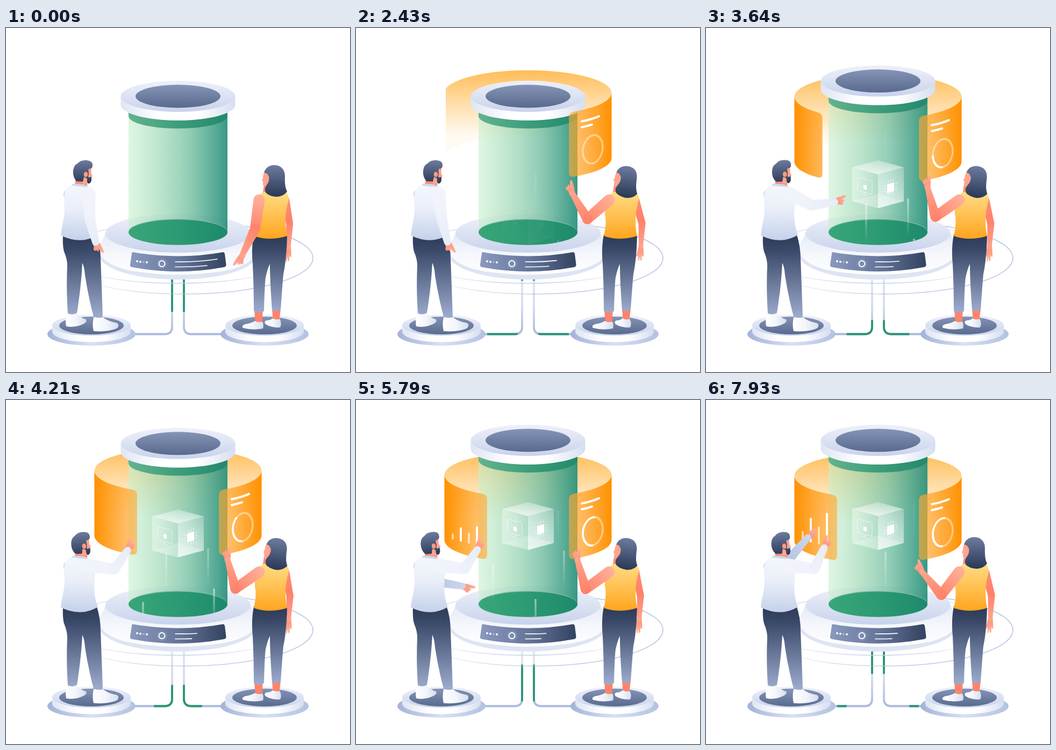
Recreate the animation shown at these times as an HTML page. Size 640 by 640 pixels, loop 8000 ms.

```html
<!DOCTYPE html>
<html lang="en">
<head>
<meta charset="utf-8">
<title>Lab capsule</title>
<style>
html, body { margin: 0; width: 100%; height: 100%; overflow: hidden; background: #fff; }
svg { display: block; width: 100vw; height: 100vh; }
</style>
</head>
<body>
<svg viewBox="0 0 640 640">
  <defs>
    <g id="disc">
      <ellipse cy="569.5" rx="82" ry="21.5" fill="url(#foot)"/>
      <path d="M-73,553V565A73,19.5 0 0 0 73,565V553Z" fill="url(#rim)"/>
      <ellipse cy="553" rx="73" ry="19.5" fill="url(#plate)"/>
      <ellipse cy="553.5" rx="60" ry="16.5" fill="url(#slate)"/>
    </g>
    <g id="pipe" fill="none" stroke-width="3.8">
      <path d="M240,569.5H295Q309,569.5 309,556V466" stroke="url(#tube)"/>
      <path id="flow" d="M244,569.5H295Q309,569.5 309,556V468" stroke="#2a9475" stroke-dasharray="68 102"/>
    </g>
    <clipPath id="glassClip"><path class="glass"/></clipPath>
    <clipPath id="rightClip"><path class="right"/></clipPath>
  </defs>

  <use href="#pipe"/>
  <use href="#pipe" transform="matrix(-1 0 0 1 640 0)"/>
  <g fill="none" stroke-width="1.3">
    <ellipse cx="331" cy="428" rx="240" ry="67" stroke="url(#orbit)"/>
    <ellipse cx="320" cy="420" rx="226" ry="55" stroke="url(#orbit2)"/>
  </g>

  <ellipse cx="320" cy="420" rx="148" ry="48" fill="url(#skirt)"/>
  <path d="M185,380Q183,392 172,405Q171,440 235,452Q320,466 405,452Q469,440 468,405Q457,392 455,380Z" fill="url(#body)"/>
  <ellipse cx="320" cy="382" rx="135" ry="36" fill="url(#plate)"/>
  <path d="M236,417Q320,432 404,417Q406,417 407,420L409.500,440Q410,444 405,445Q320,461 235,445Q230,444 231,440L234,420Q234,417 236,417Z" fill="url(#console)"/>
  <g fill="#fff">
    <circle cx="244" cy="434" r="2"/><circle cx="250" cy="435" r="2"/>
    <circle cx="256" cy="435.500" r="2" opacity=".3"/><circle cx="262" cy="436" r="2"/>
  </g>
  <circle cx="290" cy="438.500" r="10" fill="#8191b3" opacity=".7"/>
  <circle cx="290" cy="438.500" r="5.500" fill="none" stroke="#fff" stroke-width="2"/>
  <g fill="none" stroke="#fff" stroke-width="1.600" stroke-linecap="round">
    <path class="line" d="M315,435Q355,436 393,430" pathLength="1"/>
    <path class="line" d="M315,444.500Q345,445 374,442" pathLength="1"/>
  </g>

  <g class="band"><path id="wall" fill="url(#wallFill)"/></g>

  <path class="glass" fill="url(#glassFill)"/>
  <ellipse cx="320" cy="379.500" rx="92" ry="24.500" fill="#86bda9"/>
  <ellipse cx="320" cy="380" rx="92" ry="23.500" fill="url(#pool)"/>
  <g clip-path="url(#glassClip)">
    <g id="streaks"></g>
    <g id="cube">
      <path d="M272,13L320,26V89L272,76Z" fill="url(#cubeL)"/>
      <path d="M368,13L320,26V89L368,76Z" fill="url(#cubeR)"/>
      <path d="M320,0L368,13L320,26L272,13Z" fill="url(#cubeT)"/>
      <path d="M272,76L320,62L368,76L320,89Z" fill="#fff" opacity=".22"/>
      <g fill="none" stroke="#fff" stroke-width=".9">
        <path d="M284,32L307,38Q309,39 309,42V61Q309,64 306,63L284,57Q282,56 282,53V34Q282,31 284,32ZM289,63L301,67M295,60V65" opacity=".65"/>
        <path id="pins" opacity=".8"/>
      </g>
      <path d="M293,45L299,47V55L293,53Z" fill="#fff"/>
      <path d="M337,45Q344,42 350,41V57Q344,60 337,61Z" fill="#fff"/>
    </g>
  </g>

  <g id="lid">
    <path d="M228,30V37A92,23 0 0 0 412,37V30Z" fill="url(#shade)"/>
    <path d="M213.500,0V16A106.500,29 0 0 0 426.500,16V0Z" fill="url(#rim)"/>
    <ellipse cx="320" rx="106.500" ry="29" fill="url(#plate)"/>
    <ellipse cx="320" rx="79" ry="21.500" fill="url(#slate)"/>
  </g>

  <g class="band">
    <path class="right" fill="url(#rightFill)"/>
    <g clip-path="url(#rightClip)" fill="none" stroke="#fff">
      <g stroke-width="4" stroke-linecap="round"><path d="M420,53Q437,50 452,43.500M420,64Q430,62 439,59"/></g>
      <g transform="translate(440.500 105) skewY(-13)" stroke-width="3.600">
        <ellipse rx="18.500" ry="26" opacity=".42"/>
        <path id="gauge" d="M0,26A18.500,26 0 0 1 0,-26A18.500,26 0 0 1 0,26" pathLength="1"/>
      </g>
    </g>
    <path id="left" fill="url(#leftFill)"/>
    <g id="bars" fill="none" stroke="#fff" stroke-width="3.800" stroke-linecap="round"></g>
  </g>

  <use href="#disc" x="159"/>
  <use href="#disc" x="481"/>

  <g id="man">
    <g id="manBack"></g>
    <path d="M113,531L131,530Q139,540 149,542Q152,547 143,551Q128,558 112,555Q110,545 113,531Z" fill="url(#shoe)"/>
    <path d="M163,538L180,538Q190,546 207,549Q212,554 206,559Q190,566 163,564Q160,552 163,538Z" fill="url(#shoe)"/>
    <path d="M106,386Q105,405 108,416Q114,430 114,442Q112,485 115,531Q124,535 132,530Q140,480 142,437Q146,445 147,460Q153,500 163,537Q172,541 180,538Q178,480 176,430Q176,405 168,382Z" fill="url(#pants)"/>
    <path d="M130,276L152,276L151,296Q138,300 128,293Z" fill="#ff8d75"/>
    <g id="manHead">
      <path d="M146,262L159,261L158.500,270L161,275.500L158.500,278L157,288L146,290L134,285Z" fill="#ffa48d"/>
      <path d="M131,285Q124,277 125,266Q126,255 133,252Q139,245 150,246Q162,247 161,256Q161,262 154,262Q153,266 154,270L153,278L159,277Q160,288 154,289.500Q150,289 151,280L145,277L143,286Z" fill="url(#hair)"/>
      <ellipse cx="148.500" cy="272.500" rx="3.800" ry="5" fill="#ff9b84"/>
    </g>
    <path d="M123,291Q137,290 152,294Q165,298 167,310L164,345Q164,368 171,385Q140,404 102,386Q103,373 107,357Q110,340 108,322Q106,297 123,291Z" fill="url(#shirt)"/>
    <path d="M122,293Q124,288 132,290Q145,290 153,294Q154,298 148,296Z" fill="#cfd8ed"/>
    <g id="manArm"></g>
  </g>

  <g id="woman">
    <g id="womanBack"></g>
    <path d="M462,524H478L476,550L464,550ZM495,523H511L508,548L497,546Z" fill="#ff836b"/>
    <path d="M463,545Q470,549 477,546Q480,552 478,559Q460,563 441,558Q437,554 445,551Q457,549 463,545Z" fill="url(#shoe)"/>
    <path d="M496,540Q503,544 509,541Q514,549 510,557Q494,558 483,551Q479,546 485,544Q492,544 496,540Z" fill="url(#shoe)"/>
    <path d="M461,384Q456,410 459,440Q461,480 461,527Q470,531 480,527Q481,480 483,464Q487,446 491,439Q491,470 495,525Q503,528 511,525Q514,480 516,458Q522,430 523,386Z" fill="url(#pants)"/>
    <path d="M480,292L500,290L503,312L477,312Z" fill="#ff8a72"/>
    <path d="M477,306Q483,303 490,306Q508,312 521,306Q526,310 526,320Q520,340 520,358Q520,374 523,387Q490,397 461,387Q467,362 463,346Q461,320 477,306Z" fill="url(#top)"/>
    <g id="womanHead">
      <path d="M482,265Q478,273 478,279L476,284L478,286L478,291Q480,298 487,296L497,280L490,264Z" fill="#ffa48d"/>
      <path d="M480,269Q484,256 498,255Q518,255 519,275Q518,296 523,304Q517,313 504,314Q489,313 483,306Q480,298 485,292Q491,284 489,276Q486,269 480,269Z" fill="url(#hair)"/>
    </g>
    <g id="womanArm"></g>
  </g>
</svg>
<script>
const LOOP = 8000;
const svg = document.querySelector('svg');
const $ = id => document.getElementById(id);
const put = (id, name, value) => $(id).setAttribute(name, value);
const each = (sel, name, value) => svg.querySelectorAll(sel).forEach(n => n.setAttribute(name, value));
const clamp = v => Math.max(0, Math.min(1, v));

// Gradients: id, direction (v, h or user-space coordinates), stops "colour/opacity@offset"
const gradients = `
foot h #a3b2d8 #d9e1f2 #b3c1e1
rim h #dfe5f3 #ffffff #ffffff #d6def0
plate v #eef1f9 #c8d3ec
slate v #8594b6 #596a8e
tube v #dfe5f4 #d3dbef #aab9de
orbit h #b3bfe0/0@0 #b3bfe0/.15@.12 #b3bfe0/.8@.45 #a9b8de@1
orbit2 h #c3cde8/0@0 #c3cde8/.8@.35 #c3cde8@.6 #c3cde8/0@.95
skirt v #dfe5f3 #dde4f3
body v #e3e9f5 #f5f7fc #ffffff
console h #8a99bd #66769b #33425f
wallFill 0,-42,0,79 #ffbd59 #ffe2b4@.58 #fffaf2@1
glassFill h #c8f0ce/.6@0 #9fd8b5/.7@.32 #75bfa3/.8@.62 #2c927c/.94@1
pool h #39a679 #2c9a73 #1d896c
shade h #63b38f #3d9d7b #23896c
cubeL h #ffffff/.4 #ffffff/.16
cubeR 320,89,368,13 #ffffff/.75 #ffffff/.25
cubeT v #ffffff/.3 #ffffff/.75
rightFill 396,0,475,0 #ffaa36/.62 #ff9100
leftFill 244,0,165,0 #ffaa36/.62 #ff9100
pants v #2c3957 #3a4968@.2 #9daccf@1
hair v #6d7c9f #2a3754
shirt v #f5f7fc #e9eef8@.45 #c5d1eb@1
top v #ffdc85 #ffa51e
shoe h #ffffff #f3f5fb@.5 #d5deef@1
skinA h #ffb29b #ff8068
skinB h #ff8068 #ffa58e
hand h #ff8f77 #ffb09a
limb h #ff8f76 #ff7d64
sleeveA h #f1f4fb #eff2fa
sleeveB h #eff2fa #e6ecf7
backA h #c3cee8 #c3cee8
backB h #b6c3e2 #cdd7ed
streak v #ffffff #ffffff/0`.trim().split('\n').map(row => {
  const [id, dir, ...stops] = row.split(' ');
  const [a, b, c, d] = dir === 'v' ? [0, 0, 0, 1] : dir === 'h' ? [0, 0, 1, 0] : dir.split(',');
  const units = dir.length > 1 ? 'userSpaceOnUse' : 'objectBoundingBox';
  const inner = stops.map((s, i) => {
    const [paint, at = i / (stops.length - 1)] = s.split('@');
    const [color, alpha = 1] = paint.split('/');
    return `<stop offset="${at}" stop-color="${color}" stop-opacity="${alpha}"/>`;
  }).join('');
  return `<linearGradient id="${id}" gradientUnits="${units}" x1="${a}" y1="${b}" x2="${c}" y2="${d}">${inner}</linearGradient>`;
}).join('');
svg.querySelector('defs').insertAdjacentHTML('beforeend', gradients);

const POINTING = 'M-4,-5L4,-7L9,-11Q14,-11 13,-7L17,-6Q17,-3 12,-3L23,-1Q26,1 22,3L9,5L-4,5Z';
const HANGING = 'M-4,-4L8,-6L17,-7Q19,-5 14,-3L24,-4Q27,-2 24,-1L17,0L26,1Q28,3 24,3L16,4L20,7Q19,9 15,7L6,5L-4,4Z';

const bone = (len, a, b, fill) =>
  `<path d="M0,${-a}L${len},${-b}A${b},${b} 0 0 1 ${len},${b}L0,${a}A${a},${a} 0 0 1 0,${-a}Z" fill="url(#${fill})"/>`;

// Two-bone arm; the returned function takes absolute angles
function arm(id, x, y, [l1, l2], [r1, r2, r3], [f1, f2], hand = POINTING, flip = 1) {
  $(id).innerHTML = `<g>${bone(l1, r1, r2, f1)}<g><g>
    <path d="${hand}" transform="scale(1 ${flip})" fill="url(#hand)"/></g>${bone(l2, r2, r3, f2)}</g></g>`;
  const upper = $(id).firstElementChild, fore = upper.lastElementChild, palm = fore.firstElementChild;
  return (a, b, c) => {
    upper.setAttribute('transform', `translate(${x} ${y}) rotate(${a})`);
    fore.setAttribute('transform', `translate(${l1} 0) rotate(${b - a})`);
    palm.setAttribute('transform', `translate(${l2} 0) rotate(${c - b})`);
  };
}
const manArm = arm('manArm', 153, 308, [49, 43], [13, 10, 6.5], ['sleeveA', 'sleeveB'], POINTING, -1);
const manBack = arm('manBack', 118, 310, [42, 50], [11, 9, 6], ['backA', 'backB'], POINTING, -1);
const womanArm = arm('womanArm', 471, 320, [54, 56], [10.5, 9.5, 5], ['skinA', 'skinB']);
const womanBack = arm('womanBack', 520, 321, [44, 44], [7.5, 6.5, 4], ['limb', 'skinB'], HANGING);

// Orange band around the capsule, relative to its own centre line
const RX = 155.5, RY = 42, TALL = 121, START = 29.3;
const rad = d => d * Math.PI / 180;
const point = d => [320 + RX * Math.sin(rad(d)), RY * Math.cos(rad(d))];
const frontY = x => RY * Math.sqrt(Math.max(0, 1 - ((x - 320) / RX) ** 2));
const arc = (sweep, x, y) => `A${RX},${RY} 0 0 ${sweep} ${x},${y}`;

function front(from, to, ra, rb) {
  if (to <= from) return '';
  const [ax, ay] = point(from), [bx, by] = point(to);
  ra = Math.min(ra, (bx - ax) / 2);
  rb = Math.min(rb, (bx - ax) / 2);
  const a = ax + ra, b = bx - rb, ya = frontY(a), yb = frontY(b);
  return `M${ax},${ay + ra}Q${ax},${ay} ${a},${ya}${arc(0, b, yb)}Q${bx},${by} ${bx},${by + rb}`
    + `V${by + TALL - rb}Q${bx},${by + TALL} ${b},${yb + TALL}${arc(1, a, ya + TALL)}`
    + `Q${ax},${ay + TALL} ${ax},${ay + TALL - ra}Z`;
}
function back(to) {
  if (to <= 90) return '';
  const [x, y] = point(to);
  return `M${320 + RX},0${arc(0, x, y)}V${y + TALL}${arc(1, 320 + RX, TALL)}Z`;
}

put('pins', 'd', [0, 1, 2].map(i => {
  const x = 339 + 5 * i, y = 47 + 5 * i, top = 42 - 1.5 * i, end = 62 - 1.5 * i;
  return `M${x},${top}v-5M${x},${end}v5M335,${y}l-4,1M352,${y - 4}l4,-1`;
}).join(''));

const barHeights = [14, 42, 30, 59];
$('bars').innerHTML = barHeights.map((h, i) => `<path opacity="${i % 2 ? 1 : .6}"/>`).join('');

// x and rest height of each rising streak
const streaks = [[334, 370], [387, 280], [255, 305], [376, 205], [298, 214], [334, 82]];
$('streaks').innerHTML = streaks.map(([x]) => `<rect x="${x - 1.75}" width="3.5" height="72" rx="1.7" fill="url(#streak)"/>`).join('');

function draw(t) {
  const step = (a, b) => (1 - Math.cos(Math.PI * clamp((t - a) / (b - a)))) / 2;
  const swing = step(6600, 8000);

  put('flow', 'stroke-dashoffset', -(101 + .0238 * t));
  each('.line', 'stroke-dasharray', `${1 - .505 * step(0, 4800) + .03 * swing} 2`);

  // Capsule
  const lid = 127 - 52 * step(2450, 4700);
  put('lid', 'transform', `translate(0 ${lid})`);
  each('.glass', 'd', `M228,${lid + 20}V380A92,23.5 0 0 0 412,380V${lid + 20}Z`);
  put('cube', 'transform', `translate(0 ${190 + 2.38 * (lid - 75)})`);
  put('cube', 'opacity', step(2350, 2900));
  const glow = step(2100, 2900);
  [...$('streaks').children].forEach((rect, i) => {
    const y = streaks[i][1] + lid - 75 - .041 * (t - 5790);
    rect.setAttribute('y', y);
    rect.setAttribute('opacity', glow * .5 * clamp((y - 170) / 150));
  });

  // Band
  const turn = START + 241 * step(1030, 2650) + 60.4 * step(2800, 4000);
  each('.band', 'transform', `translate(0 ${116 + 25 * step(700, 6800)})`);
  each('.right', 'd', front(START, Math.min(turn, 90), 9, 0));
  put('left', 'd', front(270, turn, 0, 9));
  put('wall', 'd', back(Math.min(turn, 270)));
  put('gauge', 'stroke-dasharray', `${.53 * step(2300, 5100)} 2`);
  const grow = step(5050, 6450);
  $('bars').style.display = grow > 0 ? '' : 'none';
  [...$('bars').children].forEach((bar, i) =>
    bar.setAttribute('d', `M${180 + 15 * i},${118.5 + 3.7 * i}v${-barHeights[i] * grow}`));

  // Man
  const raise = step(2100, 4400), bend = step(2700, 4300), poke = step(5800, 6900);
  const rise = step(5100, 6800), unfold = step(4700, 6800);
  put('manHead', 'transform', `rotate(${-8 * step(2500, 4900) + 2 * swing} 142 300)`);
  manArm(86 - 79 * raise, 76 - 132 * bend - 15 * poke + 6 * swing, 55 - 131 * bend - 18 * poke + 19 * swing);
  manBack(80 - 105 * rise + 2 * swing, 80 - 134 * unfold + 5 * swing, 80 - 137 * unfold + 8 * swing);

  // Woman
  const reach = step(0, 1000), press = step(1430, 3300), rest = step(5600, 7000);
  const look = reach - rest;
  put('womanHead', 'transform', `translate(${look} ${2 * look}) rotate(${6 * look} 502 300)`);
  womanArm(
    98 + 33 * reach + 14 * press - 17 * rest,
    116 + 105 * reach + 34 * press - 14 * rest - 11 * swing,
    130 + 116 * reach + 30 * press - 4 * rest - 21 * swing);
  womanBack(77 + 3 * Math.cos(2 * Math.PI * t / 4800), 93, 95);
}

const begin = performance.now();
function frame() {
  draw((performance.now() - begin) % LOOP);
  requestAnimationFrame(frame);
}
frame();
</script>
</body>
</html>
```
